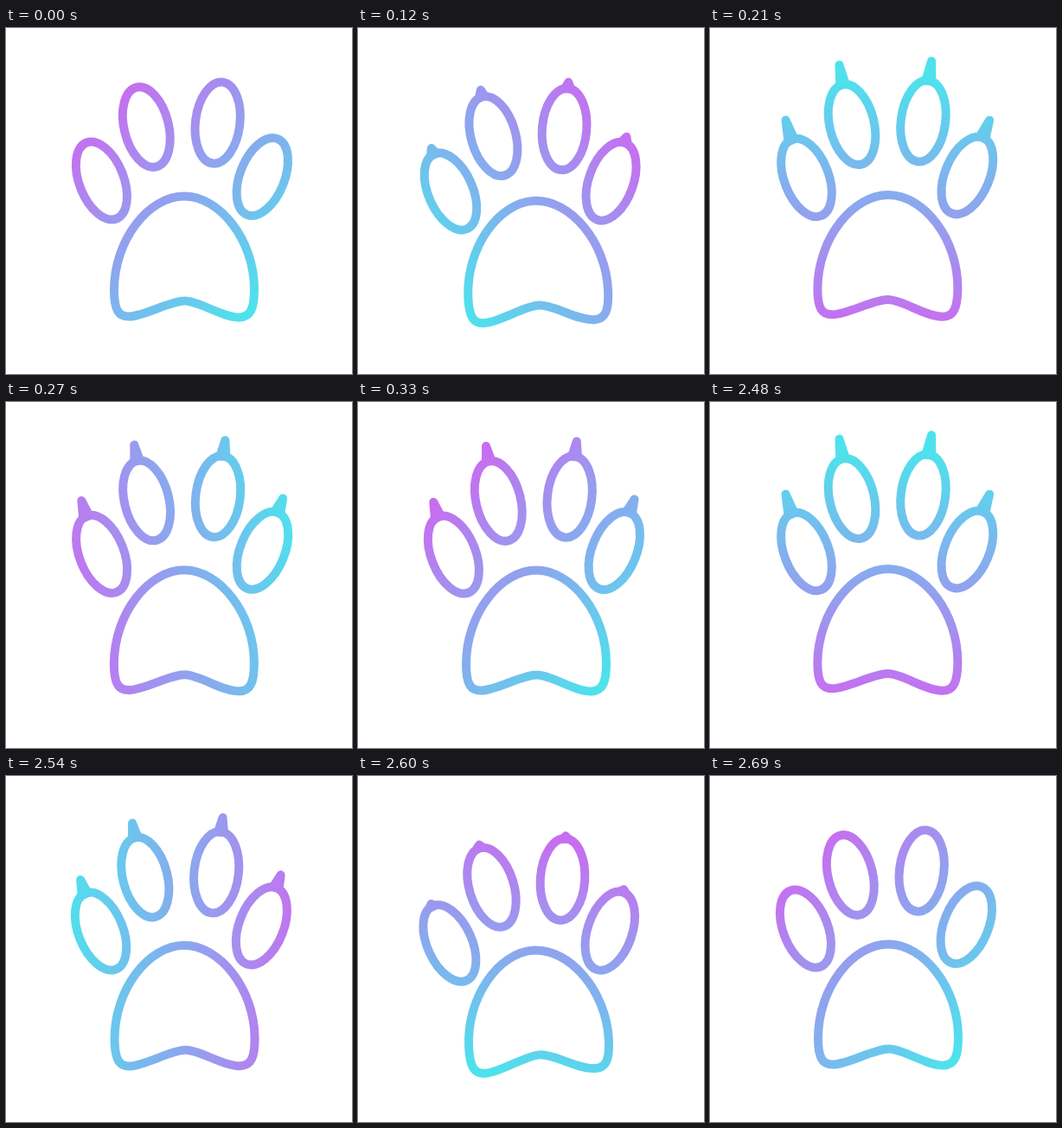
These frames come from a looping animation (400x400 px, 3720 ms). An HTML page with a canvas:

```html
<!DOCTYPE html>
<html lang="en">
<head>
<meta charset="utf-8">
<title>Paw</title>
<style>
  html, body { margin: 0; width: 100%; height: 100%; overflow: hidden; background: #fff; }
  canvas { display: block; width: 100vw; height: 100vh; }
</style>
</head>
<body>
<canvas id="stage" width="400" height="400"></canvas>
<script>
const ctx = document.getElementById('stage').getContext('2d');
const LOOP = 3720, STEP = 30, STEPS = 11, BACK = 2390;
const RAD = Math.PI / 180;

const pad = new Path2D(
  'M206 194.5 C165 194.5 125 245 125 303 C125 326 130 334 143 333.5 ' +
  'C160 333 190 315.5 206.5 315.5 C224 315.5 250 335 270 334.5 ' +
  'C283 334 287 324 287 302 C287 245 247 194.5 206 194.5 Z');

// Toe centre and tilt; claw tip and the two ends of its base
const toes = [
  { x: 110.4, y: 176.5, tilt: -21.5, tip: [87.3, 115.7], base: [89, 135, 96, 132] },
  { x: 162.3, y: 114.5, tilt: -14, tip: [148, 51], base: [148, 68, 154.5, 68] },
  { x: 244.7, y: 109.6, tilt: 7, tip: [252.8, 45.5], base: [247, 63, 254, 63.5] },
  { x: 296.3, y: 172, tilt: 22, tip: [319.5, 112.5], base: [310, 127, 317, 129] }
];

const pressKeys = [[0, 0], [3, 1], [6.3, -0.23], [10, 0]];
const clawKeys = [[0, 0], [3, 0.2], [6.3, 1.33], [10, 1]];

// Cosine easing between [position, value] keys
function track(keys, q) {
  for (let i = 1; i < keys.length; i++) {
    const [a, from] = keys[i - 1], [b, to] = keys[i];
    if (q <= b) return from + (to - from) * (1 - Math.cos(Math.PI * (q - a) / (b - a))) / 2;
  }
  return keys[keys.length - 1][1];
}

function gradient(q) {
  const x = q / STEPS;
  const turn = x * (0.144 + x * (2.127 - 1.271 * x));
  const angle = (45 + 360 * turn) * RAD;
  const dx = 142 * Math.cos(angle), dy = 142 * Math.sin(angle);
  const g = ctx.createLinearGradient(205 - dx, 203 - dy, 205 + dx, 203 + dy);
  g.addColorStop(0, '#c76ef0');
  g.addColorStop(1, '#4ee2ec');
  return g;
}

function drawToe(toe, claw) {
  ctx.beginPath();
  ctx.ellipse(toe.x, toe.y, 25.7, 47.3, toe.tilt * RAD, 0, 2 * Math.PI);
  ctx.stroke();
  if (claw <= 0) return;
  const [ax, ay, bx, by] = toe.base;
  const mx = (ax + bx) / 2, my = (ay + by) / 2;
  ctx.beginPath();
  ctx.moveTo(ax, ay);
  ctx.lineTo(mx + (toe.tip[0] - mx) * claw, my + (toe.tip[1] - my) * claw);
  ctx.lineTo(bx, by);
  ctx.closePath();
  ctx.fill();
  ctx.stroke();
}

function draw(q) {
  const press = track(pressKeys, q), claw = track(clawKeys, q);
  ctx.setTransform(1, 0, 0, 1, 0, 0);
  ctx.fillStyle = '#fff';
  ctx.fillRect(0, 0, 400, 400);

  ctx.translate(206, 245 + 7 * press);
  ctx.rotate(-3 * press * RAD);
  ctx.translate(-206, -245);
  ctx.lineWidth = 10;
  ctx.lineJoin = 'round';

  // Keep the gradient upright while the paw tilts
  const paint = gradient(q);
  ctx.strokeStyle = ctx.fillStyle = paint;
  ctx.stroke(pad);
  ctx.translate(-1.3 * press, 4.7 * press);
  for (const toe of toes) drawToe(toe, claw);
}

// Claws come out from the start of the loop and retract along the same poses
function position(t) {
  if (t < BACK) return Math.min(STEPS, Math.floor(t / STEP));
  return Math.max(0, STEPS - 1 - Math.floor((t - BACK) / STEP));
}

const start = performance.now();
function tick() {
  draw(position((performance.now() - start) % LOOP));
  requestAnimationFrame(tick);
}
tick();
</script>
</body>
</html>
```
